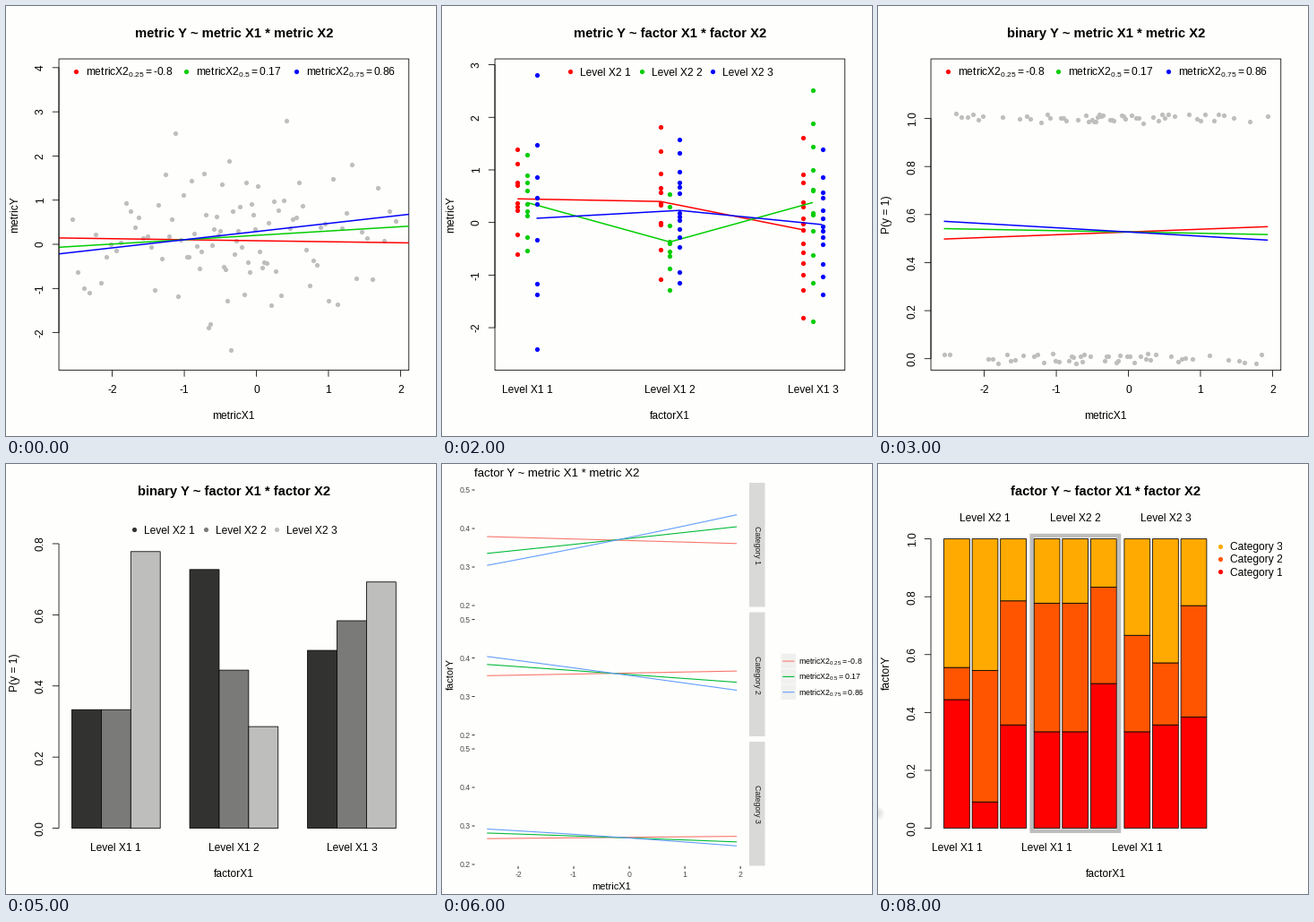
Write a matplotlib script that moves like this. It is 480 by 480 pixels and loops after 9000 ms.

```python
import numpy as np
import matplotlib.pyplot as plt
from matplotlib.animation import FuncAnimation
from matplotlib.patches import Circle, Rectangle

SIZE, DPI = 480, 96
PX = 72 / DPI
plt.rcParams.update({
    "font.family": "Liberation Sans",
    "path.snap": False,
    "mathtext.fontset": "custom",
    "mathtext.rm": "Liberation Sans",
    "mathtext.it": "Liberation Sans",
})

PAPER = "#fefefc"
RGB = ["#ff0000", "#00cd00", "#0000ff"]
HUES = ["#f8766d", "#00ba38", "#619cff"]
GRAYS = ["#323230", "#7a7b78", "#bebfbc"]
HEAT = ["#ff0000", "#ff5500", "#ffaa00"]
SILVER = "#bebebe"
LEVELS = [f"Level X2 {k}" for k in (1, 2, 3)]
CUTS = (-0.8, 0.17, 0.86)
QUANTILES = [r"$\mathrm{metricX2}_{\mathrm{%s}}=$%s" % (p, q)
             for p, q in zip((0.25, 0.5, 0.75), CUTS)]

# Plot region, text rows and the inner edges of the data
LEFT, RIGHT, TOP, BOTTOM = 59.04, 449.76, 59.04, 406.56
MIDDLE, TICK_ROW, LABEL_ROW = (LEFT + RIGHT) / 2, 432.4, 461.2
FLOOR, CEILING = 393.7, 71.9
X_MIN, X_MAX = -2.56, 1.935
Y_MIN = -2.59

# Per X2 level (rows) and X1 level (columns)
COUNT = np.array([[9, 11, 14], [9, 9, 12], [9, 14, 13]])
HITS = np.array([[3, 8, 7], [3, 4, 7], [7, 4, 9]])
FIRST = np.array([[4, 1, 5], [3, 3, 6], [3, 5, 5]])
SECOND = np.array([[1, 5, 6], [4, 4, 4], [3, 3, 5]])
MEAN = np.array([[0.45, 0.40, -0.14], [0.38, -0.37, 0.38], [0.08, 0.23, -0.04]])
REACH = np.array([[1.0, 1.5, 1.65], [0.9, 0.95, 2.15], [2.5, 1.45, 1.4]])


def bell(n):
    """n values in -1..1, denser around zero."""
    s = np.linspace(-1, 1, n)
    return 0.55 * s + 0.45 * s ** 3


def make_data(seed=4):
    """Rows of x, y, outcome, x2 level, x1 level."""
    rng = np.random.default_rng(seed)
    total = COUNT.sum()
    xs = rng.permutation(X_MIN + (X_MAX - X_MIN) * (bell(total) + 1) / 2)
    rows = []
    for k, j in np.ndindex(3, 3):
        n = COUNT[k, j]
        noise = bell(n) + rng.normal(0, 0.06, n)
        y = MEAN[k, j] + REACH[k, j] * (noise - noise.mean())
        outcome = rng.permutation(np.arange(n) < HITS[k, j])
        for value, hit in zip(y, outcome):
            rows.append((xs[len(rows)], max(value, Y_MIN), hit, k, j))
    return np.array(rows), rng.uniform(-0.02, 0.02, total)


DATA, JITTER = make_data()
X, Y, HIT, X2, X1 = DATA.T


def scale(zero, unit):
    return lambda v: zero - unit * np.asarray(v, float)


def metric_scale(unit):
    return scale(FLOOR + Y_MIN * unit, unit)


def px(x):
    return 279.5 + 80.45 * np.asarray(x, float)


fig = plt.figure(figsize=(SIZE / DPI, SIZE / DPI), dpi=DPI, facecolor=PAPER)
ax = fig.add_axes([0, 0, 1, 1])


def line(x, y, color="black", width=0.8):
    ax.plot(x, y, color=color, lw=width * PX, solid_capstyle="butt")


def dots(x, y, color, r=2.6):
    ax.scatter(x, y, s=(2 * r * PX) ** 2, c=color, linewidths=0, zorder=2)


def text(x, y, s, size=12, ha="center", rot=0, color="black", **kw):
    return ax.text(x, y, s, fontsize=size * PX, ha=ha, va="baseline", rotation=rot,
                   rotation_mode="anchor", color=color, **kw)


def box(x0, y0, x1, y1, fill="none", edge="none", width=0.8):
    ax.add_patch(Rectangle((x0, y0), x1 - x0, y1 - y0, fc=fill, ec=edge,
                           lw=width * PX, joinstyle="miter"))


def titles(main, xlab, ylab):
    text(MIDDLE, 35, main, 14.75, weight="bold")
    text(MIDDLE, LABEL_ROW, xlab)
    text(13, 232.8, ylab, rot=90)


def y_axis(ticks, y, fmt):
    line([LEFT, LEFT], [y(ticks[0]), y(ticks[-1])])
    for t in ticks:
        line([LEFT - 7.2, LEFT], [y(t)] * 2)
        text(41.8, y(t), fmt % t, rot=90)


def x_axis():
    for t in range(-2, 3):
        line([px(t)] * 2, [BOTTOM, BOTTOM + 7.2])
        text(px(t), TICK_ROW, str(t))


def frame():
    box(LEFT, TOP, RIGHT, BOTTOM, edge="black")


def legend(labels, colors, xs):
    for label, color, x in zip(labels, colors, xs):
        dots([x], [73.4], color)
        text(x + 11, 77.6, label, ha="left")


def level_legend(colors=RGB):
    legend(LEVELS, colors, 143.3 + 79.5 * np.arange(3))


def quantile_legend():
    legend(QUANTILES, RGB, 77.8 + 123.2 * np.arange(3))


def sigmoid(v):
    return 1 / (1 + np.exp(-v))


def logit(p):
    return np.log(p / (1 - p))


def metric_metric():
    titles("metric Y ~ metric X1 * metric X2", "metricX1", "metricY")
    y = metric_scale(49.3)
    dots(px(X), y(Y), SILVER)
    ends = (np.array([LEFT, RIGHT]) - px(0)) / 80.45
    for color, q in zip(RGB, CUTS):
        fit = 0.181 + 0.125 * q + (0.077 + 0.125 * q) * ends
        line([LEFT, RIGHT], y(fit), color, 1.5)
    frame()
    y_axis(range(-2, 5), y, "%d")
    x_axis()
    quantile_legend()


def metric_mixed():
    titles("metric Y ~ metric X1 * factor X2", "metricX1", "metricY")
    y = metric_scale(53.9)
    ends = (np.array([LEFT, RIGHT]) - px(0)) / 80.45
    for k, color in enumerate(RGB):
        x, v = X[X2 == k], Y[X2 == k]
        dots(px(x), y(v), color)
        line([LEFT, RIGHT], y(np.polyval(np.polyfit(x, v, 1), ends)), color, 1.5)
    frame()
    y_axis(range(-2, 4), y, "%d")
    x_axis()
    level_legend()


def metric_factor():
    titles("metric Y ~ factor X1 * factor X2", "factorX1", "metricY")
    y = metric_scale(58.7)
    for k, color in enumerate(RGB):
        xs = 84.3 + 10.6 * k + 159.5 * np.arange(3)
        own = X2 == k
        dots(xs[X1[own].astype(int)], y(Y[own]), color)
        line(xs, y(MEAN[k]), color, 1.5)
    frame()
    y_axis(range(-2, 4), y, "%d")
    for j in range(3):
        text(94.9 + 159.5 * j, TICK_ROW, f"Level X1 {j + 1}")
    level_legend()


def binary(main, top, colors, curves, key):
    titles(main, "metricX1", "P(y = 1)")
    y = scale(FLOOR, (FLOOR - CEILING) / top)
    for k in range(3):
        own = X2 == k
        dots(px(X[own]), y(HIT[own] + JITTER[own]), colors[k])
    x = np.linspace(X_MIN, X_MAX, 80)
    for color, curve in zip(RGB, curves):
        line(px(x), y(sigmoid(curve(x))), color, 1.5)
    frame()
    y_axis(np.arange(6) / 5, y, "%.1f")
    x_axis()
    key()


def binary_metric():
    curves = [lambda x, q=q: 0.11 - (0.01 + 0.07 * q) * x for q in CUTS]
    binary("binary Y ~ metric X1 * metric X2", 1.2, [SILVER] * 3,
           curves, quantile_legend)


def binary_mixed():
    ends = (0.695, 0.397), (0.315, 0.62), (0.617, 0.488)
    curves = [lambda x, p=p: np.interp(x, [X_MIN, X_MAX], logit(np.array(p)))
              for p in ends]
    binary("binary Y ~ metric X1 * factor X2", 1.1, RGB, curves, level_legend)


def binary_factor():
    titles("binary Y ~ factor X1 * factor X2", "factorX1", "P(y = 1)")
    y = scale(BOTTOM, 397)
    for k, j in np.ndindex(3, 3):
        x = 73.5 + 131.55 * j + 32.9 * k
        box(x, y(HITS[k, j] / COUNT[k, j]), x + 32.9, BOTTOM, GRAYS[k], "black")
    for j in range(3):
        text(122.8 + 131.55 * j, TICK_ROW, f"Level X1 {j + 1}")
    y_axis(np.arange(5) / 5, y, "%.1f")
    level_legend(GRAYS)


def facets(main, shares, labels, right, ticks, unit, first):
    """Stacked panels, one per category, of the share curves."""
    text(36, 13.7, main, 13.2, ha="left")
    text(12.5, 235, "factorY", 11, rot=90)
    text((36.5 + right) / 2, 475, "metricX1", 11)
    step = (right - 36.5) / 4.925
    zero = 36.5 + 2.782 * step
    x = np.linspace(X_MIN, X_MAX, 80)
    for c in range(3):
        top = 21 + 144.5 * c
        y = scale(top + first + unit * ticks[-1], unit)
        for tick in ticks:
            line([33.5, 36.5], [y(tick)] * 2, "#333333", 1.0)
            text(31.5, y(tick) + 3.2, "%.1f" % tick, 8.8, ha="right", color="#4d4d4d")
        for k, color in enumerate(HUES):
            line(zero + step * x, y(shares[k][c]), color, 1.1)
        box(right + 1, top, right + 18.5, top + 138.5, "#d9dad8")
        text(right + 6.8, top + 69.5, f"Category {c + 1}", 8.8, rot=270, color="#1a1a1a")
    for v in range(-2, 3):
        line([zero + step * v] * 2, [449, 452], "#333333", 1.0)
        text(zero + step * v, 461, str(v), 8.8, color="#4d4d4d")
    for k, label in enumerate(labels):
        top = 211.8 + 17.3 * k
        x0 = right + 36.5
        box(x0, top, x0 + 16.6, top + 16.6, "#f0f1ee")
        line([x0 + 1.7, x0 + 14.9], [top + 8.3] * 2, HUES[k], 1.1)
        text(x0 + 19.3, top + 11.6, label, 8.8, ha="left")


def blend(start, stop):
    """Multinomial shares running between two sets of shares."""
    t = np.linspace(0, 1, 80)
    w = np.exp(np.outer(np.log(start), 1 - t) + np.outer(np.log(stop), t))
    return w / w.sum(axis=0)


def category_metric():
    base = np.array([0.37, 0.36, 0.27])
    tilt = np.array([0.09, -0.06, -0.03])
    shares = [blend(base - tilt * (0.3 + q / 2), base + tilt * (0.3 + q / 2))
              for q in CUTS]
    facets("factor Y ~ metric X1 * metric X2", shares, QUANTILES, 342,
           np.arange(2, 6) / 10, 430, 8)


def category_mixed():
    shares = [blend((0.373, 0.218, 0.409), (0.230, 0.470, 0.300)),
              blend((0.455, 0.392, 0.153), (0.345, 0.402, 0.253)),
              blend((0.114, 0.581, 0.305), (0.687, 0.079, 0.234))]
    facets("factor Y ~ metric X1 * factor X2", shares, LEVELS, 372.3,
           np.arange(1, 8) / 10, 208.5, 4)


def category_factor():
    titles("factor Y ~ factor X1 * factor X2", "factorX1", "factorY")
    y = scale(BOTTOM, 323)
    box(171.7, 80, 269, 409.7, edge=SILVER, width=4.5)
    for k, j in np.ndindex(3, 3):
        x = 73.5 + 100.7 * k + 31.6 * j
        n, a, b = COUNT[k, j], FIRST[k, j], SECOND[k, j]
        edges = np.array([0, a, a + b, n]) / n
        for c in range(3):
            box(x, y(edges[c + 1]), x + 28.8, y(edges[c]), HEAT[c], "black")
    for k in range(3):
        text(119.7 + 100.7 * k, 64, LEVELS[k])
        text(88 + 100.7 * k, TICK_ROW, "Level X1 1")
    y_axis(np.arange(6) / 5, y, "%.1f")
    for c in range(3):
        row = 120.4 - 14.4 * c
        dots([382], [row], HEAT[c])
        text(393, row + 4.4, f"Category {c + 1}", ha="left")
    # The label column is cut off at the plot's right edge
    ax.add_patch(Rectangle((451, 80), 29, 50, fc=PAPER, ec="none", zorder=5))
    for r in np.arange(1.5, 8):
        ax.add_patch(Circle((0, 390), r, fc="#808080", ec="none", alpha=0.035))


SCENES = [metric_metric, metric_mixed, metric_factor,
          binary_metric, binary_mixed, binary_factor,
          category_metric, category_mixed, category_factor]


def draw(i):
    ax.cla()
    ax.set_xlim(0, SIZE)
    ax.set_ylim(SIZE, 0)
    ax.axis("off")
    SCENES[i]()
    return []


anim = FuncAnimation(fig, draw, frames=len(SCENES), init_func=lambda: [],
                     interval=1000, repeat=True, repeat_delay=0, blit=False)
plt.show()
```
